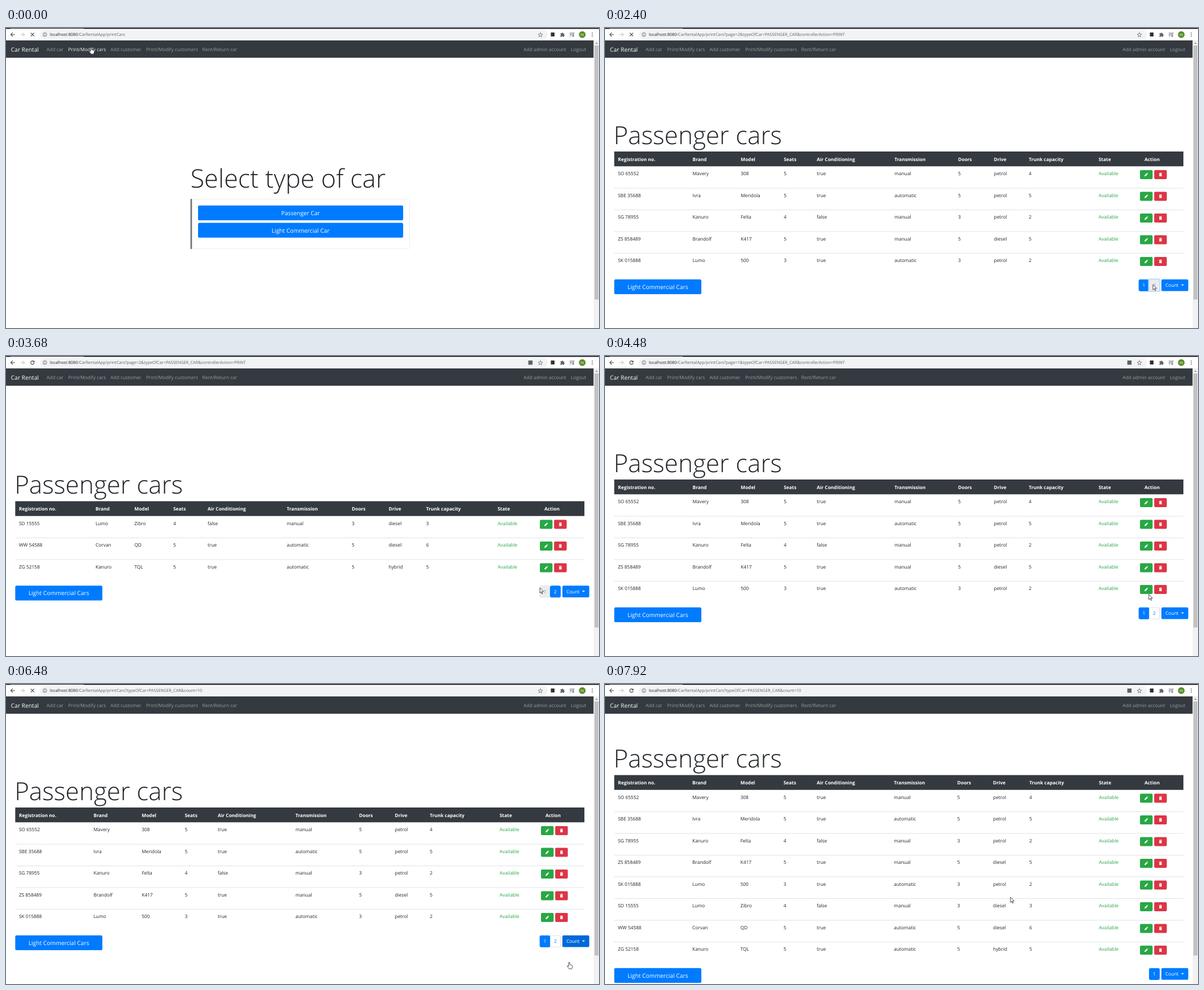
An HTML page with a canvas that plays this animation: 1053 px wide and 532 px high, repeating every 8 s.

```html
<!DOCTYPE html>
<html lang="en">
<head>
<meta charset="utf-8">
<title>Car Rental</title>
<style>
html, body { margin: 0; width: 100%; height: 100%; overflow: hidden; background: #fff; }
canvas { display: block; }
</style>
</head>
<body>
<canvas id="stage" width="1053" height="532"></canvas>
<script>
const ctx = document.getElementById('stage').getContext('2d');
const LOOP = 8000, STEP = 80;
const BLUE = '#007bff', INK = '#212529', DARK = '#343a40', GREY = '#5f6368';
const LEFT = 16.4, WIDTH = 1010.7, BAR = 26.3, PITCH = 38.5;

const HEADS = ['Registration no.', 'Brand', 'Model', 'Seats', 'Air Conditioning',
  'Transmission', 'Doors', 'Drive', 'Trunk capacity', 'State', 'Action'];
const FIRST = [
  'SO 65552|Mavery|308|5|true|manual|5|petrol|4',
  'SBE 35688|Ivra|Meridola|5|true|automatic|5|petrol|5',
  'SG 78955|Kanuro|Felta|4|false|manual|3|petrol|2',
  'ZS 858489|Brandolf|K417|5|true|manual|5|diesel|5',
  'SK 015888|Lumo|500|3|true|automatic|3|petrol|2'];
const SECOND = [
  'SD 15555|Lumo|Zibro|4|false|manual|3|diesel|3',
  'WW 54588|Corvan|QD|5|true|automatic|5|diesel|6',
  'ZG 52158|Kanuro|TQL|5|true|automatic|5|hybrid|5'];
const PAGES = {
  first: { top: 219, rows: FIRST, links: 2, active: 1, edit: 950,
    cols: [23, 155.5, 241, 317.5, 376, 514, 627, 690.5, 752.5, 876.5, 958] },
  second: { top: 257.5, rows: SECOND, links: 2, active: 2, edit: 948,
    cols: [23, 159, 228, 297, 358, 498.5, 614, 679.5, 746, 873, 956] },
  all: { top: 161.5, rows: [...FIRST, ...SECOND], links: 1, active: 1, edit: 950,
    cols: [23, 155, 240.5, 317, 376, 513, 625.5, 689, 753.5, 877, 958] }
};

// Pointer keys: time, x, y, shape from that time on
const POINTER = [
  [0, 151, 34, 'hand'], [80, 151, 34, 'hand'], [160, 175, 75, 'arrow'], [320, 320, 260, 'arrow'],
  [400, 380, 325, 'hand'], [560, 370, 327, 'arrow'], [800, 240, 255, 'arrow'],
  [880, 193, 205, 'beam'], [960, 240, 195, 'beam'], [1040, 291, 192, 'beam'],
  [1120, 350, 208, 'arrow'], [1360, 620, 340, 'arrow'], [1600, 920, 468, 'arrow'],
  [1680, 948, 474, 'arrow'], [1760, 955, 464, 'arrow'], [1840, 959, 461, 'hand'],
  [2000, 973, 455, 'hand'], [2240, 973, 455, 'arrow'], [2640, 973, 455, 'arrow'],
  [2960, 892, 360, 'arrow'], [3120, 850, 326, 'arrow'], [3280, 851, 336, 'arrow'],
  [3520, 905, 386, 'arrow'], [3680, 948, 411, 'arrow'], [3840, 956, 414, 'hand'],
  [4000, 956, 414, 'arrow'], [4400, 956, 414, 'arrow'], [4640, 985, 440, 'arrow'],
  [4720, 999, 450, 'hand'], [4800, 1009, 456, 'hand'], [5600, 1009, 456, 'hand'],
  [6000, 1000, 493, 'hand'], [6720, 1000, 493, 'hand'], [6800, 996, 491, 'arrow'],
  [7120, 960, 478, 'arrow'], [7520, 911, 453, 'arrow'], [7680, 835, 370, 'arrow'],
  [7760, 785, 348, 'arrow'], [7920, 720, 378, 'arrow']];

const within = (t, a, b) => t >= a && t < b;

function box(x, y, w, h, fill, r = 0, line) {
  ctx.beginPath();
  ctx.roundRect(x, y, w, h, r);
  if (fill) { ctx.fillStyle = fill; ctx.fill(); }
  if (line) { ctx.strokeStyle = line; ctx.lineWidth = 1; ctx.stroke(); }
}

function text(s, x, y, color = INK, size = 8.4, weight = 400, align = 'left') {
  ctx.font = `${weight} ${size}px "Open Sans", "Noto Sans", sans-serif`;
  ctx.textAlign = align;
  ctx.fillStyle = color;
  ctx.fillText(s, x, y);
}

function shape(d, x, y, fill, line, width = 1) {
  const p = new Path2D(d);
  ctx.save();
  ctx.translate(x, y);
  if (fill) { ctx.fillStyle = fill; ctx.fill(p); }
  if (line) { ctx.strokeStyle = line; ctx.lineWidth = width; ctx.stroke(p); }
  ctx.restore();
}

function dot(x, y, r, fill) {
  ctx.beginPath();
  ctx.arc(x, y, r, 0, 7);
  ctx.fillStyle = fill;
  ctx.fill();
}

function bigButton(label, x, y, w, hover) {
  box(x, y, w, BAR, hover ? '#0069d9' : BLUE, 2.6);
  text(label, x + w / 2, y + 17, '#fff', 10.3, 400, 'center');
}

function address(t) {
  const path = '/CarRentalApp/printCars';
  const paged = n => `${path}?page=${n}&typeOfCar=PASSENGER_CAR&controllerAction=PRINT`;
  if (t < 2240) return path;
  if (t < 4000) return paged(2);
  if (t < 6400) return paged(1);
  return path + '?typeOfCar=PASSENGER_CAR&count=10';
}

function browserBar(t, loading) {
  box(0, 0, 1053, 1.5, '#111');
  box(8, 1, 130, 1, '#fff');
  box(60, 4, 902, 15.5, '#f1f3f4', 7.75);
  const arrow = 'M4 0H-3.5M0 -3.5L-3.5 0L0 3.5';
  shape(arrow, 12, 11.7, null, '#3c4043', 1.1);
  ctx.save();
  ctx.scale(-1, 1);
  shape(arrow, -29.5, 11.7, null, '#babcbe', 1);
  ctx.restore();
  if (loading) {
    shape('M-3 -3L3 3M3 -3L-3 3', 47, 11.7, null, '#3c4043', 1.1);
  } else {
    shape('M2.4 -2A3.1 3.1 0 1 0 3.1 .6', 47, 11.7, null, '#3c4043', 1.1);
    shape('M3.6 -3.8V-.5H.3Z', 47, 11.7, '#3c4043');
    box(927.5, 8, 7.5, 7.5, GREY);
  }
  shape('M3.3 0A3.3 3.3 0 1 1 -3.3 0A3.3 3.3 0 1 1 3.3 0M0 -.4V1.9M0 -1.8V-1', 69, 11.7, null, GREY, .9);
  text('localhost:8080', 78, 14.2, '#202124', 7.33);
  const hostWidth = ctx.measureText('localhost:8080').width;
  text(address(t), 78 + hostWidth, 14.2, GREY, 7.33);

  shape('M0 -3.8L1.1 -1.2L3.8 -1L1.7 .8L2.4 3.5L0 2L-2.4 3.5L-1.7 .8L-3.8 -1L-1.1 -1.2Z', 949, 12, null, GREY, .8);
  box(967.5, 8, 6.5, 7, '#333');
  shape('M-3.5 -2.3H-1.3A1.2 1.2 0 1 1 1.1 -2.3H2.8V-.2A1.2 1.2 0 1 1 2.8 2.2V4H.9A1.1 1.1 0 0 0 -1.3 4H-3.5V1.9A1.1 1.1 0 0 0 -3.5 -.3Z', 988, 11.7, GREY);
  shape('M-4 -2.5H2M-4 0H2M-4 2.5H-1M2.8 2.5V-2.7H4.5', 1005, 11.5, null, GREY, 1);
  dot(1007, 14.2, 1.3, GREY);
  dot(1023.3, 11.7, 6, '#5b8f2f');
  text('m', 1023.3, 13.8, '#fff', 6.5, 400, 'center');
  for (const y of [8.7, 11.7, 14.7]) dot(1041, y, .85, GREY);
}

function navBar(t) {
  box(0, 22, 1043.6, 30.7, DARK);
  text('Car Rental', 8.7, 41.5, '#fff', 10.3);
  const items = [['Add car', 72], ['Print/Modify cars', 110.5], ['Add customer', 185.5],
    ['Print/Modify customers', 249], ['Rent/Return car', 348.5],
    ['Add admin account', 919], ['Logout', 1003]];
  items.forEach(([label, x], i) =>
    text(label, x, 41, i === 1 && t < 160 ? '#f4f4f5' : '#999da0'));
}

function scrollBar(end) {
  box(1043.6, 22, 9.4, 510, '#f1f1f1');
  box(1045, 31, 7, end - 31, '#c1c1c1');
  shape('M-2 1L0 -1.2L2 1Z', 1048.5, 27, '#777');
}

function selectPage(t) {
  text('Select type of car', 327.5, 283, INK, 45.2, 300);
  box(328.5, 303.5, 388, 88, null, 2, '#eee');
  box(327.5, 303, 2.8, 89, '#6c757d', 1);
  bigButton('Passenger Car', 341, 314.8, 364.2, t >= 400);
  bigButton('Light Commercial Car', 341, 345.5, 364.2);
}

function actions(x, y, hover) {
  box(x, y, 22.4, 16, hover ? '#218838' : '#28a745', 2);
  shape('M-3 3V1.3L.7 -2.4L2.4 -.7L-1.3 3ZM1.2 -2.9L1.8 -3.4L3.4 -1.8L2.9 -1.2Z', x + 11.2, y + 8, '#fff');
  box(x + 25.2, y, 22.4, 16, '#dc3545', 2);
  shape('M-2.1 -1.7H2.1V3H-2.1ZM-2.6 -3H-1L-.7 -3.4H.7L1 -3H2.6V-2.2H-2.6Z', x + 36.4, y + 8, '#fff');
}

function pageLink(n, x, y, active, hover, focus) {
  if (focus) box(x - 1.5, y - 1.5, 22, 24, '#bfdeff', 2);
  const fill = active ? BLUE : hover ? '#e9ecef' : '#fff';
  box(x + .5, y + .5, 18, 20, fill, 2, active ? BLUE : '#dee2e6');
  const ink = active ? '#fff' : hover ? '#7e8ea0' : BLUE;
  text(n, x + 9.4, y + 13.6, ink, 8.4, 400, 'center');
}

function countMenu(t, y, open) {
  const focus = within(t, 5360, 6480);
  const hover = within(t, 4640, 6720);
  if (focus) box(986.2, y - 1.8, 51.4, 24.4, '#80bdff', 3.5);
  box(988, y, 47.7, 20.8, focus ? '#0062cc' : hover ? '#0069d9' : BLUE, 2.2);
  text('Count', 995, y + 13.4, '#fff');
  shape('M-2.6 -1.3H2.6L0 1.3Z', 1025.5, y + 10.2, '#fff');
  if (!open) return;
  box(982.5, y + 21.5, 70, 62, '#fff', 2, '#d4d4d4');
  [5, 10, 15].forEach((n, i) => text(n, 996, y + 38.2 + i * 17.5));
}

function tablePage(page, t, open) {
  const { rows, cols, links, active, edit } = page;
  const top = page.top - (open ? 5 : 0);
  text('Passenger cars', 15.2, top - 13.5, INK, 44.2, 300);
  box(LEFT, top, WIDTH, BAR, DARK);
  HEADS.forEach((head, i) => text(head, cols[i], top + 16.5, '#fff', 8.4, 700));
  rows.forEach((row, k) => {
    const y = top + 26 + k * PITCH;
    if (k) box(LEFT, y, WIDTH, 1, '#dee2e6');
    row.split('|').forEach((cell, i) => text(cell, cols[i], y + 16.2));
    text('Available', cols[9], y + 16.2, '#28a745');
    actions(edit, y + 7, k === 4 && within(t, 4240, 4480));
  });
  const y = top + 34.3 + rows.length * PITCH;
  bigButton('Light Commercial Cars', LEFT, y, 154.7);
  for (let n = 1; n <= links; n++) {
    const x = 966 - (links - n) * 18.4;
    const hover = n === 2 ? within(t, 1920, 2480) : within(t, 3680, 4240);
    const focus = n === 2 ? within(t, 2240, 2480) : within(t, 4000, 4240);
    pageLink(n, x, y, n === active, hover, focus);
  }
  countMenu(t, y, open);
}

function pointer(t) {
  let i = POINTER.length - 1;
  while (POINTER[i][0] > t) i--;
  const [t0, x0, y0, kind] = POINTER[i];
  const [t1, x1, y1] = POINTER[i + 1] || [LOOP, x0, y0];
  const k = (t - t0) / (t1 - t0);
  const x = x0 + (x1 - x0) * k, y = y0 + (y1 - y0) * k;
  if (kind === 'arrow') {
    shape('M0 0V9.3L2.1 7.3L3.6 10.7L5 10.1L3.5 6.8H6.5Z', x, y, '#fff', '#222', .8);
  } else if (kind === 'hand') {
    shape('M-1 1Q0 -.5 1 1V4.6L5 5.6Q6.1 6 5.7 8.5L4.6 12.2H0L-3.3 7.8Q-3.5 6.3 -2 6.9L-1 7.8Z', x, y, '#fff', '#222', .8);
  } else {
    shape('M-2 -4.5H2M0 -4.5V4.5M-2 4.5H2', x, y, null, '#888', .9);
  }
}

function draw(now) {
  const t = Math.floor(now % LOOP / STEP) * STEP;
  const loading = [[0, 80], [400, 640], [2240, 2560], [4000, 4320], [6400, 6720]]
    .some(([a, b]) => within(t, a, b));
  const open = within(t, 5440, 6480);
  box(0, 0, 1053, 532, '#fff');
  if (t < 560) selectPage(t);
  else tablePage(t >= 6720 ? PAGES.all : within(t, 2480, 4240) ? PAGES.second : PAGES.first, t, open);
  browserBar(t, loading);
  navBar(t);
  scrollBar(open ? 472 : 481.5);
  pointer(t);
}

ctx.textRendering = 'geometricPrecision';
const start = performance.now();
function tick() {
  draw(performance.now() - start);
  requestAnimationFrame(tick);
}
tick();
</script>
</body>
</html>
```
